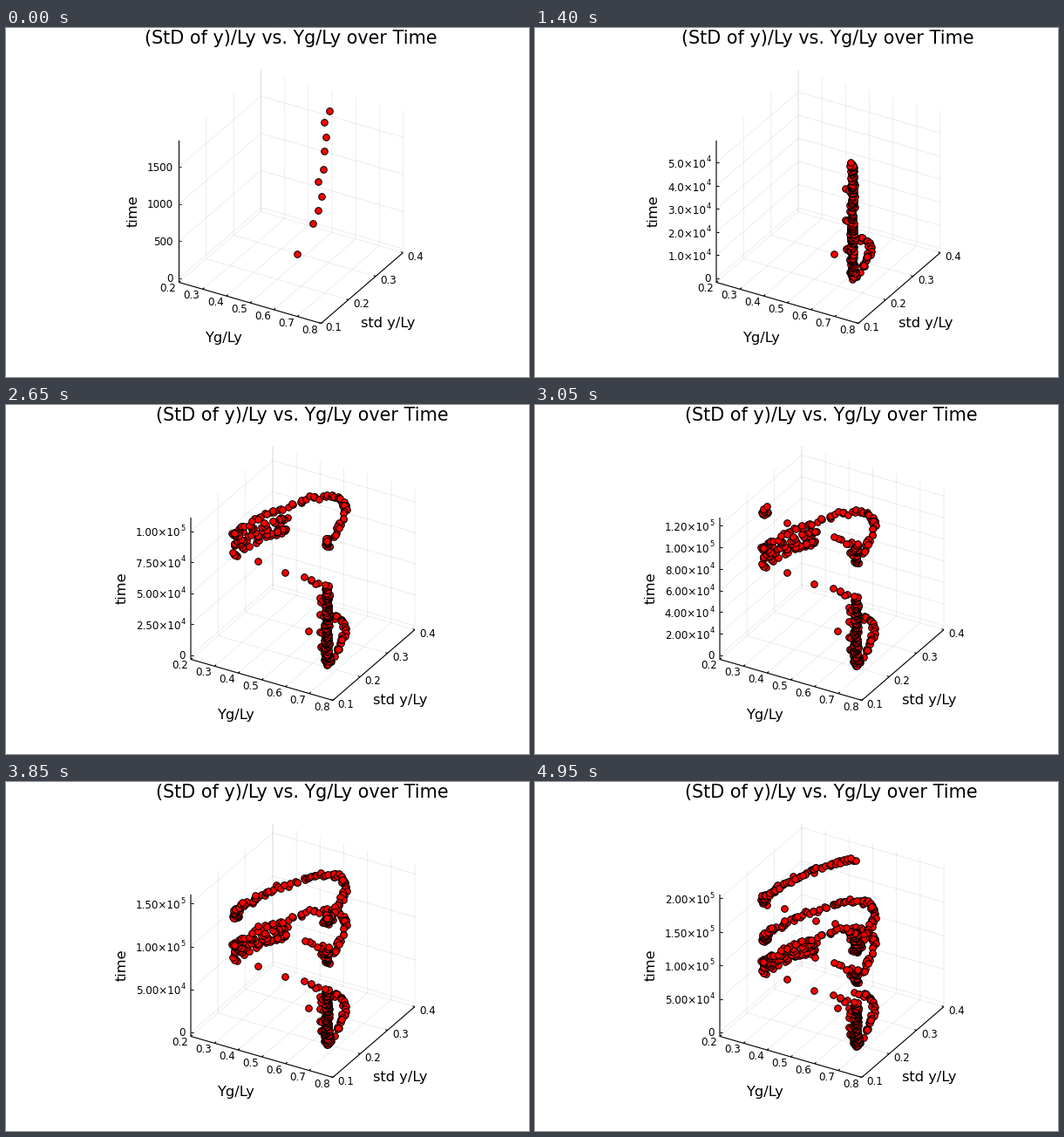
Write a matplotlib script that moves like this. It is 600 by 400 pixels and loops after 5 s.

```python
import numpy as np
import matplotlib.pyplot as plt
from matplotlib.animation import FuncAnimation

W, H, DPI = 600, 400, 100
FRAMES, INTERVAL = 100, 50
PER_FRAME, DT = 10, 200

plt.rcParams["font.family"] = "DejaVu Sans"
PX = 72 / DPI
TITLE, GUIDE, TICK, SUP = 20.75 * PX, 16.3 * PX, 11.85 * PX, 8.3 * PX
DIGIT = 7.6

# Projected box: edge vectors in pixels for the three axes
X_EDGE = np.array([163, 47])
Y_EDGE = np.array([94, -81])
Z_EDGE = np.array([0, -162.5])
BOTTOM = 291.5

# Tick bases with their niceness
BASES = [(1, 1), (5, 0.9), (2, 0.7), (2.5, 0.5), (3, 0.2)]

# Floor path in pixels from the left corner: rest, straight drop to the
# far state, then a Bezier arc back to rest
START, REST, FAR = np.array([(135, -28), (156, 21), (50, -13)])
BEND_OUT, BEND_IN = np.array([(100, -38), (226, -84)])

# Sample index at which each lap leaves rest, starts its arc, is back
LAPS = [(-100, -49, 45), (352, 440, 524), (592, 632, 748), (880, 915, 1074)]
DROP, SWING, TWITCH = 10, 36, 65


def smooth(t):
    t = np.clip(t, 0, 1)
    return t * t * (3 - 2 * t)


def drop_path(f):
    return REST + f[:, None] * (FAR - REST)


def arc_path(s):
    s = s[:, None]
    r = 1 - s
    return r**3 * FAR + 3 * r * r * s * BEND_OUT + 3 * r * s * s * BEND_IN + s**3 * REST


def make_orbit():
    rng = np.random.default_rng(4)
    i = np.arange(FRAMES * PER_FRAME)
    jitter = rng.normal(0, 0.015, i.size)
    # at rest, with a short twitch towards the far state now and then
    orbit = drop_path(0.08 * np.exp(-((i % TWITCH - TWITCH // 2) / 1.5) ** 2))
    for leave, climb, back in LAPS:
        settle = leave + DROP
        t = (i - leave) / DROP
        drop = 0.4 * np.clip(t, 0, 1) + 0.6 * smooth((t - 0.6) / 0.3)
        # a long stay in the far state swings part of the way back
        stay = climb - settle
        swing = 0.3 * np.sin(np.pi * (stay // SWING) * (i - settle) / stay) ** 2
        s = np.where(i < climb, swing, smooth((i - climb) / (back - climb)))
        dropping = (leave <= i) & (i < settle)
        away = (settle <= i) & (i < back)
        orbit[dropping] = drop_path(drop)[dropping]
        orbit[away] = arc_path(np.clip(s + jitter, 0, 1))[away]
    orbit += np.clip(rng.normal(0, 1.4, orbit.shape), -3, 3)
    orbit[0] = START
    return orbit


ORBIT = make_orbit()


def pick_ticks(t_max):
    """Choose evenly spaced ticks by count, coverage and niceness."""
    top, span = 1.03 * t_max, 1.06 * t_max
    best, ticks = -1, None
    for power in (2, 3, 4):
        for base, nice in BASES:
            step = base * 10 ** power
            n = int(top // step) + 1
            if not 4 <= n <= 8:
                continue
            score = (1 - abs(n - 5) / 5) / 4 + span / (2 * (n - 1) * step) + nice / 4
            if base == 2.5:  # settles ties
                score += 1e-6 if span < 4.6667 * step else -1e-6
            if score > best:
                best, ticks = score, np.arange(n) * step
    return ticks


def split_sci(value):
    power = int(np.floor(np.log10(value) + 1e-9))
    return value / 10 ** power, power


def tick_labels(ticks):
    """Return (text, exponent) pairs and the widest label in pixels."""
    if ticks[-1] <= 1e4:
        labels = [(f"{t:.0f}", "") for t in ticks]
        return labels, DIGIT * len(labels[-1][0])
    parts = [split_sci(t) for t in ticks[1:]]
    places = 1 + max(len(f"{m:g}".partition(".")[2]) for m, _ in parts)
    labels = [("0", "")] + [(f"{m:.{places}f}×10", str(p)) for m, p in parts]
    return labels, DIGIT * (3 + places) + 19.3


fig = plt.figure(figsize=(W / DPI, H / DPI), dpi=DPI, facecolor="white")
ax = fig.add_axes([0, 0, 1, 1])


def path(points, **style):
    xs, ys = zip(*points)
    ax.plot(xs, ys, **style)


def write(x, y, text, size, ha="center", **kw):
    ax.text(x, y, text, fontsize=size, ha=ha, va="baseline", **kw)


def draw(frame):
    ax.clear()
    ax.set_xlim(0, W)
    ax.set_ylim(H, 0)
    ax.axis("off")

    count = (frame + 1) * PER_FRAME
    t_max = (count - 1) * DT
    ticks = pick_ticks(t_max)
    labels, width = tick_labels(ticks)
    # the box moves right by half of what the labels grow
    left = round(2 * (198.5 + (width - 4 * DIGIT) / 2)) / 2
    origin = np.array([left, BOTTOM])

    def at(x, y, z):
        return origin + x * X_EDGE + y * Y_EDGE + z * Z_EDGE

    def height(t):
        return (t / t_max + 0.03) / 1.06

    grid = dict(color="black", alpha=0.07, lw=0.72)
    axis = dict(color="black", lw=0.8, solid_capstyle="butt")

    for x in np.arange(7) / 6:
        path([at(x, 0, 0), at(x, 1, 0), at(x, 1, 1)], **grid)
    for y in np.arange(4) / 3:
        path([at(1, y, 0), at(0, y, 0), at(0, y, 1)], **grid)
    for z in height(ticks):
        path([at(0, 0, z), at(0, 1, z), at(1, 1, z)], **grid)

    path([at(0, 0, 1), at(0, 0, 0), at(1, 0, 0), at(1, 1, 0)], **axis)

    for k in range(7):
        px, py = at(k / 6, 0, 0)
        path([(px, py), at(k / 6, 0.02, 0)], **axis)
        write(px - 12.7, py + 11, f"{0.2 + k / 10:.1f}", TICK)
    for k in range(4):
        px, py = at(1, k / 3, 0)
        path([(px, py), at(1 - 0.015, k / 3, 0)], **axis)
        write(px + 14.6, py + 8.2, f"{0.1 + k / 10:.1f}", TICK)
    for t, (text, power) in zip(ticks, labels):
        px, py = at(0, 0, height(t))
        path([(px, py), (px + 2.5, py)], **axis)
        if power:
            write(px - 11.8, py + 5.7, text, TICK, "right")
            write(px - 6.3, py - 0.8, power, SUP, "right")
        else:
            write(px - 6.7, py + 4.4, text, TICK, "right")

    write(left + 128, 18, "(StD of y)/Ly vs. Yg/Ly over Time", TITLE)
    write(left + 51, 360, "Yg/Ly", GUIDE)
    write(left + 240, 343, "std y/Ly", GUIDE)
    write(left - width - 17.3, 210, "time", GUIDE,
          rotation=90, rotation_mode="anchor")

    xs = left + ORBIT[:count, 0]
    ys = BOTTOM + ORBIT[:count, 1] + height(np.arange(count) * DT) * Z_EDGE[1]
    ax.plot(xs, ys, "o", ms=7.6 * PX, mfc="red", mec="black", mew=0.75)


anim = FuncAnimation(fig, draw, frames=FRAMES, interval=INTERVAL,
                     repeat=True, repeat_delay=0)
plt.show()
```
